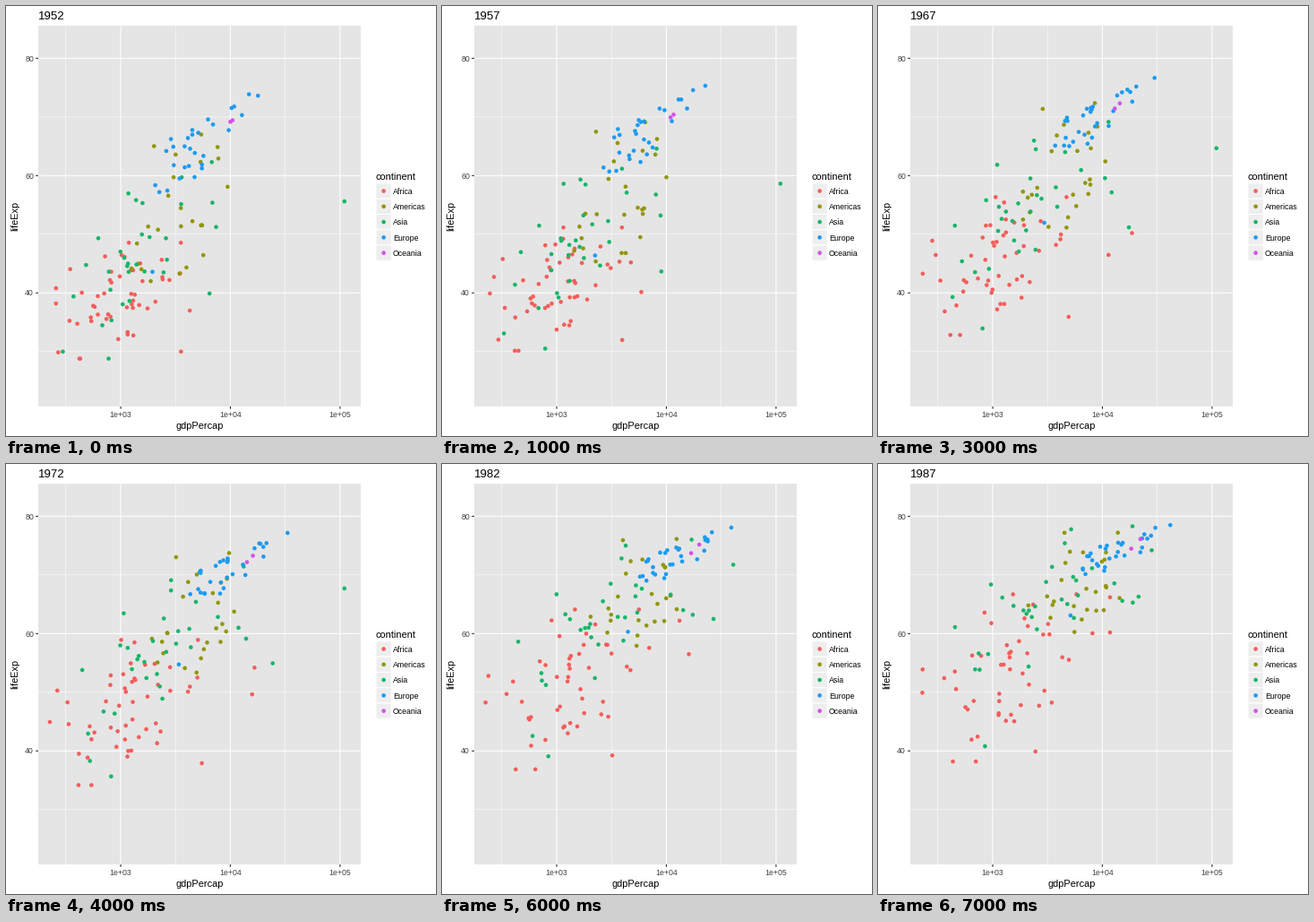
These frames come from a looping animation (480x480 px, 8 s). A matplotlib script:

```python
import numpy as np
import matplotlib.pyplot as plt
from matplotlib.animation import FuncAnimation
from matplotlib.patches import Rectangle

SIZE, STEPS = 480, 8
YEARS = 1952 + 5 * np.arange(STEPS)
PT = 0.75  # points per pixel at 96 dpi
DOT = (4.6 * PT) ** 2
LEFT, RIGHT, TOP, BOTTOM = 36, 396, 22, 447

plt.rcParams["font.family"] = "Liberation Sans"

# name: colour, count, correlation, ease power, then (start, end) of
# mean and spread for log10 income and for life expectancy
GROUPS = {
    "Africa": ("#F35E5A", 49, 0.45, 1.0,
               (2.96, 3.12), (0.28, 0.35), (39.2, 53.2), (5.2, 7.5)),
    "Americas": ("#929607", 25, 0.65, 0.9,
                 (3.53, 3.81), (0.25, 0.25), (53.3, 68.1), (9.3, 5.8)),
    "Asia": ("#18B56A", 29, 0.7, 1.0,
             (3.17, 3.5), (0.33, 0.42), (47.0, 65.7), (8.5, 7.0)),
    "Europe": ("#1A9BF3", 29, 0.85, 0.72,
               (3.7, 4.12), (0.24, 0.22), (65.1, 74.0), (5.2, 2.5)),
    "Oceania": ("#D650EB", 2, 0.9, 1.0,
                (4.01, 4.305), (0.01, 0.03), (69.3, 75.3), (0.1, 0.6)),
}

# Dots far from their cloud: key points of year, log10 income, life
OUTLIERS = [
    ("Asia", [(1952, 5.04, 55.6), (1972, 5.04, 67.7), (1977, 4.77, 69.3), (1987, 4.45, 74.2)]),
    ("Asia", [(1952, 3.81, 39.9), (1977, 4.53, 58.7), (1987, 4.33, 66.3)]),
    ("Asia", [(1952, 2.57, 39.4), (1967, 2.72, 45.4), (1977, 2.72, 31.2), (1987, 2.84, 53.9)]),
    ("Asia", [(1952, 2.89, 28.8), (1987, 2.93, 40.8)]),
    ("Africa", [(1952, 3.63, 37.0), (1977, 4.34, 52.8), (1987, 4.07, 60.2)]),
    ("Africa", [(1952, 3.38, 42.7), (1967, 4.27, 50.2), (1987, 4.07, 66.2)]),
    ("Africa", [(1952, 3.55, 30.0), (1972, 3.74, 37.9), (1987, 3.39, 39.9)]),
    ("Europe", [(1952, 3.29, 43.6), (1987, 3.71, 63.1)]),
]


def px(log_income):
    return LEFT + (log_income - 2.2487) / 2.94 * (RIGHT - LEFT)


def py(life):
    return BOTTOM - (life - 20.649) / 64.904 * (BOTTOM - TOP)


def normals(rng, n):
    z = rng.normal(size=n).clip(-1.9, 1.9)
    return (z - z.mean()) / z.std()


def cloud(rng, n, corr, power, *stats):
    """A correlated cloud whose mean and spread ease while dots change rank."""
    def latent():
        z = normals(rng, n)
        return z, corr * z + np.sqrt(1 - corr ** 2) * normals(rng, n)

    first, last = latent(), latent()
    steps = []
    for t in np.linspace(0, 1, STEPS):
        turn = 0.6 * t
        zx, zy = (np.cos(turn) * a + np.sin(turn) * b for a, b in zip(first, last))
        mx, sx, my, sy = (a + (b - a) * t ** power for a, b in stats)
        steps.append(np.column_stack([px(mx + sx * zx),
                                      py(my + sy * zy.clip(-2, 1.8))]))
    return np.array(steps)


def path(keys):
    years, income, life = np.array(keys).T
    track = np.column_stack([px(np.interp(YEARS, years, income)),
                             py(np.interp(YEARS, years, life))])
    return track[:, None]


rng = np.random.default_rng(7)
tracks, colours = [], []
for name, (colour, n, *rule) in GROUPS.items():
    parts = [cloud(rng, n, *rule)] + [path(k) for g, k in OUTLIERS if g == name]
    tracks += parts
    colours += [colour] * (n + len(parts) - 1)
tracks = np.concatenate(tracks, axis=1)

fig = plt.figure(figsize=(5, 5), dpi=96, facecolor="white")
ax = fig.add_axes([0, 0, 1, 1])
ax.set(xlim=(0, SIZE), ylim=(SIZE, 0))
ax.axis("off")


def label(x, y, text, size, colour="black", **kw):
    return ax.text(x, y, text, fontsize=size * PT, color=colour, **kw)


def line(xs, ys, width, colour="white"):
    ax.plot(xs, ys, color=colour, lw=width * PT, solid_capstyle="butt",
            snap=False, zorder=2)


def box(x, y, w, h, colour, edge=0):
    ax.add_patch(Rectangle((x, y), w, h, fc=colour, ec="white",
                           lw=edge * PT, snap=False))


box(LEFT, TOP, RIGHT - LEFT, BOTTOM - TOP, "#E5E5E5")
for power in (2.5, 3.5, 4.5):
    line([px(power)] * 2, [TOP, BOTTOM], 0.53)
for life in (30, 50, 70):
    line([LEFT, RIGHT], [py(life)] * 2, 0.53)
for power in (3, 4, 5):
    x = px(power)
    line([x, x], [TOP, BOTTOM], 1.07)
    line([x, x], [BOTTOM, BOTTOM + 2.75], 1.07, "#272727")
    label(x, 459, f"1e+0{power}", 8.8, "#404040", ha="center")
for life in (40, 60, 80):
    y = py(life)
    line([LEFT, RIGHT], [y, y], 1.07)
    line([LEFT - 2.75, LEFT], [y, y], 1.07, "#272727")
    label(31, y + 3.2, str(life), 8.8, "#404040", ha="right")

label(216, 472, "gdpPercap", 11, ha="center")
label(13, 234.5, "lifeExp", 11, ha="center", rotation=90, rotation_mode="anchor")
title = label(LEFT, 15, "1952", 13.2)

KEY = 17.28
key_ys = 206.5 + KEY * np.arange(len(GROUPS))
label(412.5, 194, "continent", 11)
for name, y in zip(GROUPS, key_ys):
    box(413, y - KEY / 2, KEY, KEY, "#EEEEEE", edge=1.07)
    label(432, y + 3.2, name, 8.8)
ax.scatter([421.6] * len(key_ys), key_ys, s=DOT, lw=0, zorder=3,
           c=[group[0] for group in GROUPS.values()])

dots = ax.scatter(*tracks[0].T, s=DOT, c=colours, lw=0, zorder=3)


def update(i):
    dots.set_offsets(tracks[i])
    title.set_text(str(YEARS[i]))
    return dots, title


anim = FuncAnimation(fig, update, frames=STEPS, interval=1000, repeat=True,
                     repeat_delay=0)
plt.show()
```
